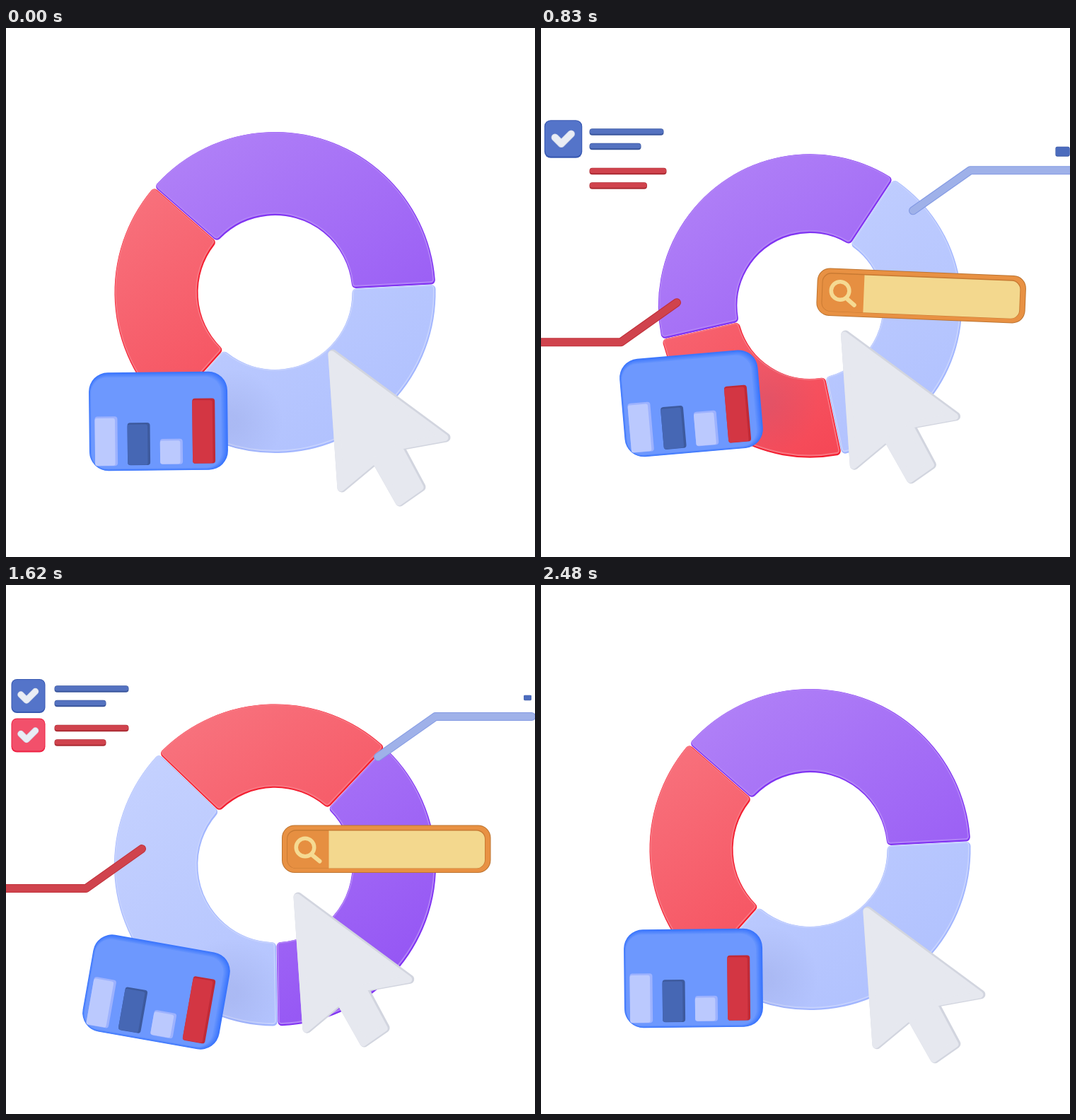
Recreate the animation shown at these times as an HTML page with a canvas. Size 748x748 px, loop 2520 ms.

```html
<!DOCTYPE html>
<html lang="en">
<head>
<meta charset="utf-8">
<title>Chart loop</title>
<style>
html, body { margin: 0; width: 100%; height: 100%; overflow: hidden; background: #fff; }
canvas { display: block; width: 100vw; height: 100vh; }
</style>
</head>
<body>
<canvas id="stage" width="748" height="748"></canvas>
<script>
const ctx = document.getElementById('stage').getContext('2d');
const LOOP = 2520;
const RAD = Math.PI / 180;

// Beats shared by all drifting parts; each list returns to its first value.
const BEATS = [0, 590, 1030, 1340, 1620, 1970, 2480];
const POSE = {
  ringY: [374, 406, 381, 377, 396, 403.5],
  ringSize: [227, 211, 221, 242, 227.5, 227.5],
  ringTurn: [0, -21.5, -73.3, 39.8, 92, -33],
  cardY: [556, 548.5, 519.5, 528.5, 575.5, 500.5],
  cardTurn: [-0.6, -7.5, -3, -12, 10, -12.5],
  pointerX: [459, 440, 413, 371, 410, 414],
  pointerY: [455, 380, 464, 429, 435, 397],
  leaderY: [30, 27, -1, -33, 0, 11],
  searchTurn: [0, 3, 1.25, -1.2, 0, 0]
};

const PURPLE = [264, 88, 69];
const PALE = [227, 98, 86.5];
const RED = [355, 90, 66];
const BLUE = [222, 98, 72];
const NAVY = [223, 46, 54];
const CRIMSON = [356, 60, 54];
const ROSE = [350, 86, 63];

const tone = ([h, s, l], shift = 0) => `hsl(${h} ${s}% ${l + shift}%)`;

// Smooth curve through the beats, level at every turning point.
function pose(name, t) {
  const v = [...POSE[name], POSE[name][0]];
  const last = BEATS.length - 1;
  if (t >= BEATS[last]) return v[last];
  const slope = i => (v[i + 1] - v[i]) / (BEATS[i + 1] - BEATS[i]);
  const tangent = i => {
    if (i === 0 || i === last) return 0;
    const a = slope(i - 1), b = slope(i);
    return a * b <= 0 ? 0 : 2 * a * b / (a + b);
  };
  const i = BEATS.findIndex(beat => beat > t) - 1;
  const span = BEATS[i + 1] - BEATS[i];
  const p = (t - BEATS[i]) / span, q = 1 - p;
  return v[i] * (1 + 2 * p) * q * q + v[i + 1] * p * p * (3 - 2 * p) +
    span * p * q * (q * tangent(i) - p * tangent(i + 1));
}

function ease(t, from, to) {
  const p = Math.min(1, Math.max(0, (t - from) / (to - from)));
  return p * p * (3 - 2 * p);
}

const bump = (t, peak) => Math.exp(-(((t - peak) / 200) ** 2));

// Grows past full size and settles; swells again at end, then shrinks away.
function pop(t, start, end) {
  const peak = 1.12, swell = peak - 1;
  return peak * ease(t, start, start + 267) - swell * ease(t, start + 267, start + 400) +
    swell * ease(t, end - 130, end) - peak * ease(t, end, end + 267);
}

function placed(x, y, turn, size, draw) {
  if (size < 0.02) return;
  ctx.save();
  ctx.translate(x, y);
  ctx.rotate(turn * RAD);
  ctx.scale(size, size);
  draw();
  ctx.restore();
}

function box(x, y, w, h, r, fill) {
  ctx.beginPath();
  ctx.roundRect(x, y, w, h, r);
  ctx.fillStyle = fill;
  ctx.fill();
}

function trace(points) {
  ctx.beginPath();
  points.forEach(([x, y]) => ctx.lineTo(x, y));
}

function line(points, width, color) {
  trace(points);
  ctx.lineWidth = width;
  ctx.strokeStyle = color;
  ctx.stroke();
}

// Fills the current path and pads it with a rounded border.
function padded(pad, paint) {
  ctx.fillStyle = ctx.strokeStyle = paint;
  ctx.lineWidth = pad * 2;
  ctx.fill();
  ctx.stroke();
}

function slice(outer, from, to, color) {
  const pad = 6, far = outer - pad, near = outer * 0.48 + pad;
  const inset = r => Math.asin((pad + 0.3) / r);
  const shape = (dx, dy) => {
    ctx.beginPath();
    ctx.arc(dx, dy, far, from * RAD + inset(far), to * RAD - inset(far));
    ctx.arc(dx, dy, near, to * RAD - inset(near), from * RAD + inset(near), true);
    ctx.closePath();
  };
  const depth = (100 - color[2]) * 0.14;
  const face = ctx.createLinearGradient(-130, -190, 130, 190);
  face.addColorStop(0, tone(color, depth));
  face.addColorStop(1, tone(color, -depth));
  shape(0, 0);
  padded(pad, tone(color, -depth * 2.6));
  shape(-0.5, -1);
  padded(4.8, tone(color, depth * 1.2));
  shape(-0.5, -1.2);
  padded(3, face);
}

function drawRing(t) {
  const size = pose('ringSize', t);
  placed(380.5, pose('ringY', t), 0, 1, () => {
    let from = 221.1 + pose('ringTurn', t);
    for (const [span, color] of [[136, PURPLE], [134.7, PALE], [89.3, RED]]) {
      slice(size, from, from + span, color);
      from += span;
    }
  });

  // Soft shade that the card throws on the ring.
  ctx.save();
  ctx.globalCompositeOperation = 'source-atop';
  const x = 317, y = pose('cardY', t);
  const shade = ctx.createRadialGradient(x, y, 10, x, y, 75);
  shade.addColorStop(0, 'rgba(70,80,150,.1)');
  shade.addColorStop(1, 'rgba(70,80,150,0)');
  ctx.fillStyle = shade;
  ctx.fillRect(x - 80, y - 80, 160, 160);
  ctx.restore();
}

function drawLeaders(t) {
  const length = 260 * (ease(t, 105, 740) - ease(t, 1458, 2312));
  if (length < 0.5) return;
  const leader = (points, color) => {
    line(points, 12, tone(color, -7));
    line(points, 10, tone(color));
  };
  placed(0, pose('leaderY', t), 0, 1, () => {
    ctx.setLineDash([length, 999]);
    leader([[526, 243], [607, 186], [790, 186]], [226, 63, 77]);
    leader([[192, 373], [113, 429], [-60, 429]], CRIMSON);
  });
}

function drawTag(t) {
  placed(737.5, 159.5 + pose('leaderY', t), 0, pop(t, 700, 1443), () => {
    box(-18.5, -13, 37, 26, 5, tone(NAVY, -10));
    box(-17.5, -12, 36, 23, 5, tone(NAVY, -2));
  });
}

function drawList(t) {
  for (let i = 0; i < 4; i++) {
    const second = i % 2, group = i >> 1;
    const color = group ? CRIMSON : NAVY;
    const y = 147 + 20.5 * second + 55.5 * group;
    const w = (second ? 73 : 105) * pop(t, 345 + 68 * i, 1751 + 92 * i);
    if (w < 1) continue;
    box(68.5, y - 4.7, w, 9.4, 4, tone(color, -12));
    box(69, y - 4.2, w - 1, 7, 3.5, tone(color));
  }
  [[224, 52, 56], ROSE].forEach((color, i) =>
    placed(31.5, 157 + 55.5 * i, 0, pop(t, 547 + 301 * i, 1882 + 158 * i), () => {
      box(-24, -24, 48, 48, 8, tone(color, -10));
      box(-23, -23, 46, 45, 7, tone(color));
      const mark = [[-10.5, -2], [-2.5, 6], [10, -6.5]];
      line(mark, 9.5, '#ced5e8');
      line(mark, 8, '#e9edf5');
    }));
}

function drawCard(t) {
  placed(212.5 + 3 * bump(t % 2480, 0), pose('cardY', t), pose('cardTurn', t), 1, () => {
    for (let i = 0; i < 6; i++) {
      box(-98 + i * 0.6, -69.5 + i * 1.4, 196 - i * 2.4, 139 - i * 2, 27 - i, tone(BLUE, i * 2 - 11));
    }
    const bars = [
      // rest height, swing, peak time, color
      [70, -8, 1340, PALE], [60, 12, 1340, [222, 44, 49]],
      [36, 34, 1030, PALE], [92, -32, 1030, [355, 64, 52]]
    ];
    bars.forEach(([rest, swing, peak, color], i) => {
      const h = rest + swing * bump(t, peak);
      const x = -90 + 46 * i, base = 62.5 - i * 0.7;
      box(x, base - h, 32, h, 4, tone(color, -6));
      box(x, base - h + 2.5, 28.5, h - 3, 3, tone(color));
    });
  });
}

function drawSearch(t) {
  placed(410, 373.5, pose('searchTurn', t), pop(t, 150, 2100), () => {
    box(-20, -34, 295.5, 67.5, 18, '#bd7430');
    box(-19, -33, 293.5, 65.5, 17, '#e89143');
    box(-13, -27.5, 281, 55, 13, '#c87a33');
    box(-12, -26, 60, 53, [12, 0, 0, 12], '#e68f41');
    box(46.5, -26, 220.5, 53, [0, 12, 12, 0], '#f3d88e');
    line([[22.5, 8], [33.5, 17]], 6, '#f5da92');
    ctx.beginPath();
    ctx.arc(13, -2.5, 12.8, 0, 7);
    ctx.lineWidth = 5.5;
    ctx.stroke();
  });
}

function drawPointer(t) {
  const arrow = [[3, 6], [163, 124], [97, 136], [128, 194], [98, 215], [64, 155], [16, 195]];
  const size = 1 - 0.045 * bump(t, 590) - 0.015 * Math.sin(Math.PI * t / LOOP);
  placed(pose('pointerX', t), pose('pointerY', t), 0, size, () => {
    const layer = (pad, color) => {
      trace(arrow);
      ctx.closePath();
      padded(pad, color);
    };
    layer(6.5, '#d2d5df');
    ctx.translate(-1.6, 0.4);
    layer(5, '#e6e8ef');
  });
}

function frame(t) {
  ctx.clearRect(0, 0, 748, 748);
  ctx.lineCap = ctx.lineJoin = 'round';
  [drawRing, drawLeaders, drawTag, drawList, drawCard, drawSearch, drawPointer].forEach(draw => draw(t));
}

const begin = performance.now();
function loop() {
  frame((performance.now() - begin) % LOOP);
  requestAnimationFrame(loop);
}
loop();
</script>
</body>
</html>
```
